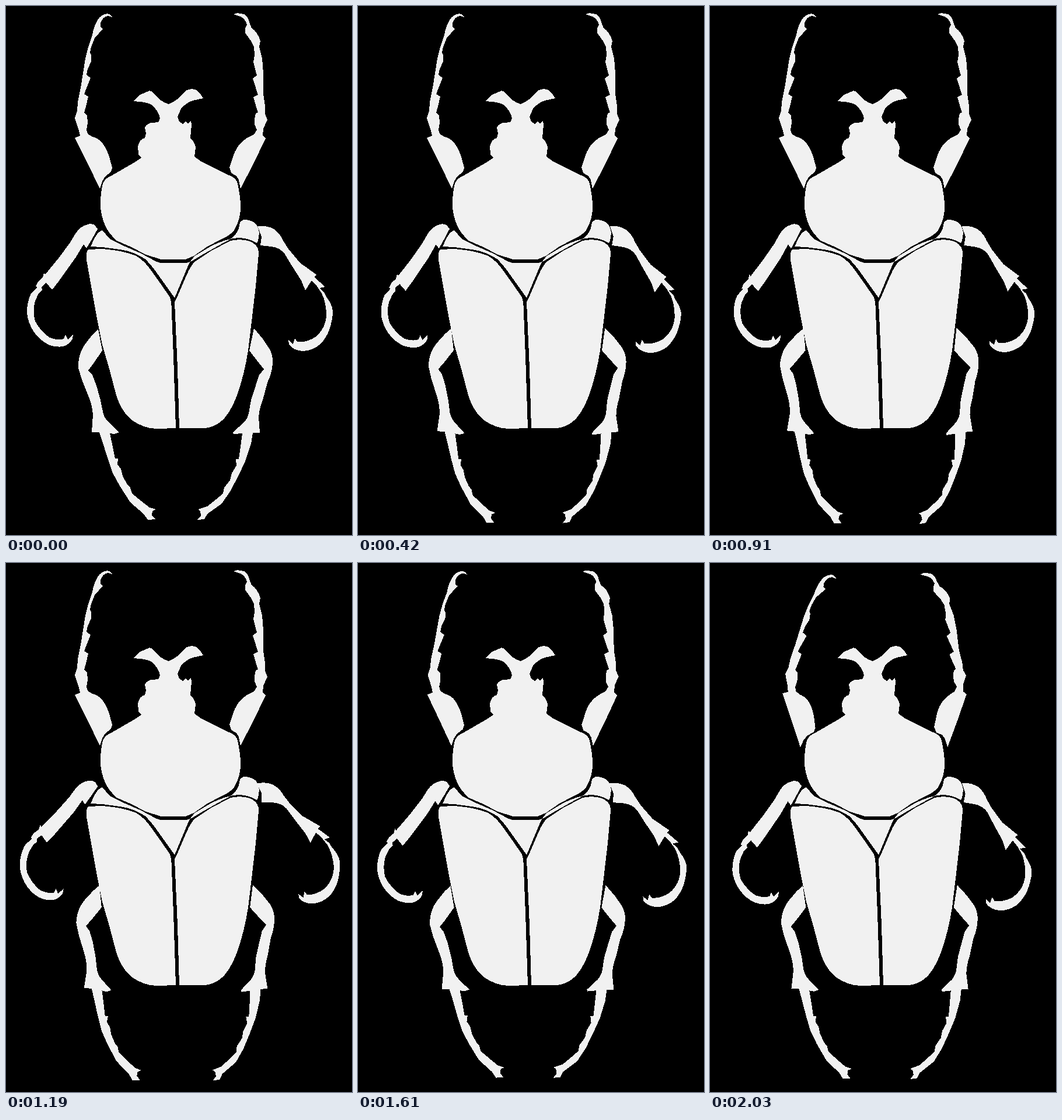
These frames come from a looping animation (593x906 px, 2.1 s). An HTML page:

```html
<!DOCTYPE html>
<html lang="en">
<head>
<meta charset="utf-8">
<title>Beetle</title>
<style>
  html, body { margin: 0; width: 100%; height: 100%; overflow: hidden; background: #000; }
  svg { display: block; width: 100vw; height: 100vh; fill: #f1f1f1; shape-rendering: crispEdges; }
</style>
</head>
<body>
<svg viewBox="0 0 593 906">
  <path id="frontL" d="M182 19L179 15L174 13Q163 14 157 24Q150 36 148 50L141 70L136 90L132 115L128 140L123 165L122 180L118 192L124 210L127 222L118 226L140 270L161 313L165 300L170 292L180 284L182 277L178 262Q173 243 162 231Q154 225 148 224L140 219L138 212L140 200L139 188L134 183L137 172L141 155L134 151L137 143L145 123L138 118L140 108L146 95L146 84L144 80L146 70L152 55L166 39L162 36L162 29Q166 18 175 17Z"/>
  <path id="frontR" d="M390 14L396 12L408 14Q416 19 417 28L421 38Q431 44 436 60L434 70L439 90L441 115L441 150L444 172L444 185L448 195L441 210L440 222L445 227L424 270L402 313L399 298L395 291L386 286L383 276L388 262Q393 244 403 234Q411 226 425 220L430 212L426 203L426 193L428 184L432 182L428 170L424 156L432 152L428 140L423 124L430 119L427 108L424 96L426 84L425 70L420 60L410 46L410 38L413 32Q409 19 398 17Z"/>
  <path id="midL" d="M157 382L152 375Q146 372 140 374Q127 377 119 390L110 405L90 432L67 460L65 457L63 465L55 472L51 480L53 482L43 492Q36 506 36 525Q37 541 47 557Q58 573 73 580Q86 585 98 583Q110 579 114 570L115 562L106 571L102 563L99 570Q88 573 75 568Q60 558 50 540Q45 522 50 505L56 492L62 486L61 481L69 474L79 486L90 472L100 458L120 430L133 408L138 415L148 398Z"/>
  <path id="midR" d="M431 377Q446 375 459 382Q470 390 475 402L484 416L504 440L532 460L528 464L547 481L537 483L545 490L549 498Q559 511 560 522Q560 537 554 555Q549 568 539 579Q524 591 508 591Q493 590 485 580L484 572L492 579L495 569L499 575Q514 577 530 567Q548 552 549 530Q549 508 541 492L533 480L524 470L513 487L506 470L490 445L478 425Q470 414 455 412L436 410L438 395Z"/>
  <path id="hindL" d="M158 553L148 563L135 580Q123 597 124 620L130 640L142 670Q148 685 149 700L147 730L160 730L165 745L174 774L183 800L195 822L213 850L236 870L243 880L256 879L250 872L251 865L257 862L246 859L232 848L216 835L213 825L208 820L200 805L197 793L191 785L192 775L187 775L183 755L178 732L186 733L194 730L176 713Q167 705 165 690L162 675L155 650L148 632L141 624L150 612L165 590Z"/>
  <path id="hindR" d="M425 552L440 570L452 588Q458 600 457 612Q456 628 448 645L440 675Q434 690 433 704L435 731L423 731L420 750L410 780L398 805L385 830L370 852L345 870L340 879L328 880L334 873L333 865L329 862L345 857L360 845L372 835L374 825L384 812L387 800L395 787L394 776L399 776L402 755L405 732L390 733L389 730L408 713Q416 704 417 692L420 675L428 650L434 632L442 622L430 607L417 590Z"/>
  <!-- head and pronotum -->
  <path d="M218 163L230 152L246 145L251 147L262 159Q271 166 279 168Q289 164 298 156L308 145Q317 140 326 144L332 149L338 158L320 162Q308 166 300 176L294 190L297 198L303 202L308 198L312 201L317 197L318 203L316 226Q323 232 325 242L323 258L334 266L380 289Q395 294 397 304L399 315Q402 328 402 342Q403 364 391 384Q384 393 370 399L345 412L322 428L308 434L266 434L240 426L215 413L190 402Q177 391 170 376Q162 358 162 340Q162 322 165 308Q167 296 180 291L220 268L232 260L227 254L226 240Q229 228 238 226L240 218L238 208Q242 200 252 200L260 199Q265 196 263 188Q259 178 252 171Q244 165 230 164Z"/>
  <!-- scutellum and shoulders -->
  <path d="M165 384L178 399L200 410L232 424L258 438L264 440L309 440L318 437L340 424L372 406Q388 399 394 390Q400 382 401 370L407 366Q422 366 429 374Q433 380 434 389L432 402L430 406Q415 397 398 397Q378 398 352 411L325 427Q316 435 312 445L289 500L262 462Q248 442 238 433Q218 420 195 417L165 413L145 412L152 397L158 388Z"/>
  <!-- wing cases -->
  <path d="M141 417L165 416Q202 419 223 428Q237 436 248 452L266 477L281 499Q284 508 284 525L287 600L291 723L260 724Q237 724 217 710Q197 695 188 663L178 625L165 580L155 530L146 480L138 435Q137 420 141 417Z"/>
  <path d="M385 402Q403 398 418 403Q434 410 433 425L428 480L421 540L415 590Q409 628 398 661Q388 690 375 705Q361 721 341 723L297 723L294 620L289 507L293 499L309 462Q317 443 325 437L352 419Z"/>
</svg>
<script>
  const LOOP = 2100, STEP = 70, STRIDE = 525;

  // keys: [ms, degrees], period: how often the swing repeats
  const legs = [
    { id: 'frontL', pivot: [140, 270], period: LOOP, keys: [[0, 0], [1540, 0], [2030, 8], [LOOP, 8]] },
    { id: 'frontR', pivot: [424, 270], period: LOOP, keys: [[0, 0], [1530, 0], [2030, -6.8], [LOOP, -6.8]] },
    { id: 'midL', pivot: [150, 385], period: STRIDE, keys: [[0, 0], [140, 5.3], [280, -3.4], [STRIDE, 0]] },
    { id: 'midR', pivot: [437, 390], period: STRIDE, keys: [[0, 0], [140, -5.4], [455, 3.6], [STRIDE, 0]] },
    { id: 'hindL', pivot: [166, 576], period: STRIDE, keys: [[0, 0], [280, 9.9], [STRIDE, 0]] },
    { id: 'hindR', pivot: [417, 576], period: STRIDE, keys: [[0, 0], [280, -9.9], [STRIDE, 0]] }
  ];
  for (const leg of legs) leg.el = document.getElementById(leg.id);

  function angleAt(keys, t) {
    const i = keys.findIndex(key => key[0] > t);
    const [t0, a0] = keys[i - 1], [t1, a1] = keys[i];
    return a0 + (a1 - a0) * (t - t0) / (t1 - t0);
  }

  function draw(ms) {
    const t = Math.floor((ms % LOOP) / STEP) * STEP;
    for (const { el, pivot, period, keys } of legs) {
      el.setAttribute('transform', `rotate(${angleAt(keys, t % period)} ${pivot})`);
    }
  }

  const start = performance.now();
  function tick() {
    draw(performance.now() - start);
    requestAnimationFrame(tick);
  }
  tick();
</script>
</body>
</html>
```
